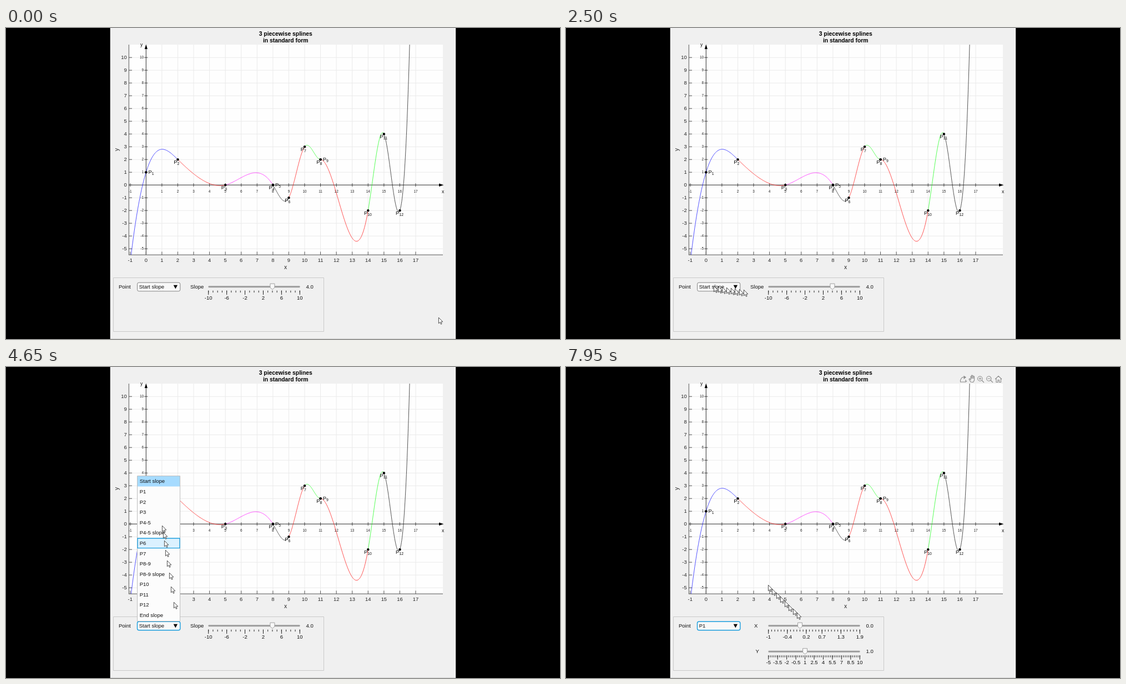
Animation, 998 px wide and 561 px high, one loop 8000 ms. Source, as an HTML page with a canvas:

```html
<!DOCTYPE html>
<html>
<head>
<meta charset="utf-8">
<style>
html, body { margin: 0; width: 100%; height: 100%; overflow: hidden; background: #000; }
canvas { display: block; }
</style>
</head>
<body>
<canvas id="stage" width="998" height="561"></canvas>
<script>
const c = document.getElementById('stage').getContext('2d');
const LOOP = 8000, STEP = 50, TRAIL = 30;
const OPEN = 3650, CLOSE = 6250, PANEL = 6300, TOOLBAR = 7400;
const INK = '#262626', ACCENT = '#1c9ede';
const ITEMS = ['Start slope', 'P1', 'P2', 'P3', 'P4-5', 'P4-5 slope', 'P6', 'P7', 'P8-9',
  'P8-9 slope', 'P10', 'P11', 'P12', 'End slope'];
const ITEM_TOP = 197, ITEM_H = 18.58;

// Pointer moves; each eases out with the given power (1 is linear)
const MOVES = [
  { start: 1320, end: 2150, to: [356, 477], power: 1.9 },
  { start: 2150, end: 2600, to: [240, 462], power: 1 },
  { start: 2600, end: 2880, to: [308, 466], power: 2 },
  { start: 4400, end: 5000, to: [274, 241], power: 3 },
  { start: 5000, end: 5200, to: [271, 229], power: 1 },
  { start: 5200, end: 5590, to: [282, 227], power: 1 },
  { start: 7320, end: 7740, to: [364, 393], power: 1 },
  { start: 7740, end: 7950, to: [416, 443], power: 1 }];

function pointer(t) {
  let pos = [779, 522];
  for (const { start, end, to, power } of MOVES) {
    if (t <= start) break;
    const k = 1 - (1 - Math.min(1, (t - start) / (end - start))) ** power;
    pos = pos.map((v, i) => v + (to[i] - v) * k);
  }
  return pos.map(Math.round);
}

const px = x => 252.3 + 28.57 * x;
const py = y => 283.2 - 23 * y;

// Three clamped cubic splines: knots, end slopes, piece colours
const SPLINES = [
  { x: [0, 2, 5, 8], y: [1, 2, 0, 0], slopes: [4, -2], colors: ['#00f', '#f00', '#f0f'] },
  { x: [8, 9, 10, 11], y: [0, -1, 3, 2], slopes: [-2, 0], colors: ['#000', '#f00', '#0f0'] },
  { x: [11, 14, 15, 16], y: [2, -2, 4, -2], slopes: [0, 3], colors: ['#f00', '#0f0', '#000'] }];

// Slopes at the inner knots follow from a continuous second derivative
function knotSlopes({ x, y, slopes: [first, last] }) {
  const h = [0, 1, 2].map(i => x[i + 1] - x[i]);
  const d = h.map((w, i) => (y[i + 1] - y[i]) / w);
  const diag = i => 2 / h[i] + 2 / h[i + 1];
  const rhs = i => 3 * (d[i] / h[i] + d[i + 1] / h[i + 1]);
  const a = diag(0), b = 1 / h[1], e = diag(1);
  const p = rhs(0) - first / h[0], q = rhs(1) - last / h[2], det = a * e - b * b;
  return [first, (p * e - q * b) / det, (a * q - b * p) / det, last];
}

function line(x1, y1, x2, y2, color = INK, width = 1) {
  c.strokeStyle = color;
  c.lineWidth = width;
  c.beginPath();
  c.moveTo(x1, y1);
  c.lineTo(x2, y2);
  c.stroke();
}

function paint(fill, stroke, width = 1) {
  if (fill) { c.fillStyle = fill; c.fill(); }
  if (stroke) { c.strokeStyle = stroke; c.lineWidth = width; c.stroke(); }
}

function poly(points, fill, stroke, width) {
  c.beginPath();
  points.forEach(([x, y]) => c.lineTo(x, y));
  c.closePath();
  paint(fill, stroke, width);
}

function box(x, y, w, h, fill, stroke, radius = 0, width = 1) {
  c.beginPath();
  c.roundRect(x, y, w, h, radius);
  paint(fill, stroke, width);
}

function text(s, x, y, size = 9.5, align = 'left', color = '#111', weight = '') {
  c.font = `${weight} ${size}px "Liberation Sans", Arial, sans-serif`;
  c.textAlign = align;
  c.textBaseline = 'middle';
  c.fillStyle = color;
  c.fillText(s, x, y);
}

function drawAxes() {
  box(221, 30, 566, 379, '#fefefe');
  for (let i = -1; i <= 17; i++) line(px(i), 30, px(i), 409, '#eaeaea');
  for (let i = -5; i <= 10; i++) line(221, py(i), 787, py(i), '#eaeaea');
  line(221.3, 30, 221.3, 409.5, '#555');
  line(221, 409.2, 787, 409.2, '#555');
  line(px(0), 34, px(0), 409, '#333');
  line(221, py(0), 784, py(0), '#333');
  poly([[px(0), 29.5], [249.7, 38], [254.9, 38]], '#000');
  poly([[788.5, py(0)], [780, 280.4], [780, 286]], '#000');
  for (let i = -1; i <= 17; i++) {
    const x = px(i);
    line(x, 403.5, x, 409, '#555');
    text(i, x, 419.3, 9.4, 'center', INK);
    if (!i) continue;
    line(x, 280.2, x, 286.2, '#444');
    text(i, x, 295.7, 6.4, 'center', INK);
  }
  for (let i = -5; i <= 10; i++) {
    const y = py(i);
    line(221, y, 227, y, '#555');
    text(i, 217.7, y + 0.5, 9.4, 'right', INK);
    if (!i) continue;
    line(249.3, y, 255.3, y, '#444');
    text(i, 248, y + 0.2, 6.4, 'right', INK);
  }
  text('x', 787, 296, 8.5, 'center');
  text('y', 244, 30.5, 8.5, 'center');
  text('x', 503.7, 432.3, 10.35, 'center', INK);
  c.save();
  c.translate(200.5, 219.5);
  c.rotate(-Math.PI / 2);
  text('y', 0, 0, 10.35, 'center', INK);
  c.restore();
  text('3 piecewise splines', 503.7, 10.7, 10.35, 'center', '#000', 'bold');
  text('in standard form', 503.7, 23.2, 10.35, 'center', '#000', 'bold');
}

function drawPiece({ x, y, colors }, i, m, from, to) {
  const h = x[i + 1] - x[i], d = (y[i + 1] - y[i]) / h;
  const b = (3 * d - 2 * m[i] - m[i + 1]) / h, a = (m[i] + m[i + 1] - 2 * d) / (h * h);
  c.beginPath();
  for (let k = 0; k <= 80; k++) {
    const u = from + (to - from) * k / 80 - x[i];
    c.lineTo(px(x[i] + u), py(y[i] + u * (m[i] + u * (b + u * a))));
  }
  paint(null, colors[i], 0.9);
}

function drawCurves() {
  c.save();
  c.beginPath();
  c.rect(221, 30, 566, 379);
  c.clip();
  c.globalAlpha = 0.75;
  SPLINES.forEach((s, n) => {
    const m = knotSlopes(s);
    for (let i = 0; i < 3; i++) {
      drawPiece(s, i, m, n + i === 0 ? -1.1 : s.x[i], n + i === 4 ? 16.8 : s.x[i + 1]);
    }
  });
  c.restore();
  SPLINES.forEach((s, n) => s.x.forEach((x, i) => {
    const X = px(x), Y = py(s.y[i]);
    c.beginPath();
    c.arc(X, Y, 2.2, 0, 7);
    paint('#000');
    const lx = X + (i ? -7.3 : 4.2), ly = Y + (i ? 5.3 : 0.6);
    text('P', lx, ly, 9.4);
    text(n * 4 + i + 1, lx + 6.3, ly + 2.3, 6.8);
  }));
}

// Major ticks split the range evenly, rounded to one decimal
function drawSlider(y, min, max, minor, parts, value) {
  const at = v => 364.7 + 164.6 * (v - min) / (max - min);
  box(364.5, y - 1.5, 165, 3, '#9c9c9c', null, 1);
  for (let v = min; v < max + minor / 2; v += minor) line(at(v), y + 7, at(v), y + 10.5, '#222');
  for (let i = 0; i <= parts; i++) {
    const v = Math.round((min + (max - min) * i / parts) * 10) / 10;
    line(at(v), y + 7, at(v), y + 14.5, '#222');
    text(v, at(v), y + 20.2, 9.5, 'center');
  }
  const x = at(value);
  poly([[x - 4, y - 5.5], [x + 4, y - 5.5], [x + 4, y + 1.5], [x, y + 5], [x - 4, y + 1.5]],
    '#f8f8f8', '#a0a0a0');
  text(value.toFixed(1), 540.5, y + 0.5);
}

function drawPanel(t) {
  box(193.5, 450.5, 379, 97, null, '#c9c9c9');
  text('Point', 203, 467.2);
  const focus = t >= OPEN;
  box(236.5, 459.2, 77.3, 15.6, '#f8f8f8', focus ? ACCENT : '#858585', 3, focus ? 1.4 : 1);
  text(t < CLOSE ? 'Start slope' : 'P1', 239.7, 467.2);
  poly([[301.7, 463.8], [309, 463.8], [305.3, 470.5]], '#000');
  if (t < PANEL) {
    text('Slope', 332, 467.2);
    drawSlider(466.7, -10, 10, 1, 5, 4);
  } else {
    text('X', 339, 467.2);
    drawSlider(466.7, -1, 1.9, 0.1, 5, 0);
    text('Y', 341.5, 513.7);
    drawSlider(513.2, -5, 10, 0.3, 10, 1);
  }
}

function drawList(t) {
  box(236.5, 196.5, 77, 262, '#fcfcfc', '#bdbdbd');
  box(237, ITEM_TOP, 76, ITEM_H, '#a6dbff');
  const hover = Math.floor((pointer(t - 2 * TRAIL)[1] - ITEM_TOP) / ITEM_H);
  if (hover > 0 && hover < ITEMS.length) {
    box(237, ITEM_TOP + hover * ITEM_H + 0.5, 76, ITEM_H - 1, '#dbf1ff', ACCENT, 0, 1.3);
  }
  ITEMS.forEach((s, i) => text(s, 240.7, ITEM_TOP + (i + 0.53) * ITEM_H));
}

function drawToolbar() {
  const gray = '#8c8c8c';
  const stroke = d => {
    c.strokeStyle = gray;
    c.lineWidth = 1.1;
    c.stroke(new Path2D(d));
  };
  stroke('M710.5 23v4h9.5v-4M711 23c1-4 4-5 7-5');
  poly([[716.5, 15.5], [721, 18.5], [716.5, 22]], gray);
  poly([[719.5, 25], [722.5, 25], [721, 27]], gray);
  stroke('M729 27l-3-5 1-1 2 2v-6h1.5v4v-6h1.7v6v-5h1.7v5v-4h1.6v7l-2 3.5z');
  for (const x of [746, 762]) {
    stroke(`M${x + 4} 21a4.2 4.2 0 1 1-8.4 0a4.2 4.2 0 1 1 8.4 0M${x + 3} 24l4 4M${x - 2.4} 21h4.6`);
  }
  stroke('M745.9 18.7v4.6M773 22l6-5.7 6 5.7M775 20.5v7h3v-4h2.4v4h3v-7');
}

const ARROW = [[0, 0], [0, 10.6], [2.4, 8.4], [4.1, 12.1], [5.7, 11.4], [4.1, 7.8], [7.4, 7.6]];

function drawPointer(t) {
  let last = '';
  for (let k = 7; k >= 0; k--) {
    const [x, y] = pointer(t - k * TRAIL);
    if (last === `${x},${y}`) continue;
    last = `${x},${y}`;
    poly(ARROW.map(([dx, dy]) => [x + 0.4 + dx, y + 0.3 + dy]), '#fff', '#222', 0.8);
  }
}

function frame(now) {
  const t = Math.floor(now % LOOP / STEP) * STEP;
  box(0, 0, 998, 561, '#000');
  box(187.7, 0, 622.5, 561, '#f0f0f0');
  line(188, 560.5, 810, 560.5, '#d4d4d4');
  drawAxes();
  drawCurves();
  drawPanel(t);
  if (t >= OPEN && t < CLOSE) drawList(t);
  if (t >= TOOLBAR) drawToolbar();
  drawPointer(t);
  requestAnimationFrame(() => frame(performance.now()));
}
frame(0);
</script>
</body>
</html>
```
